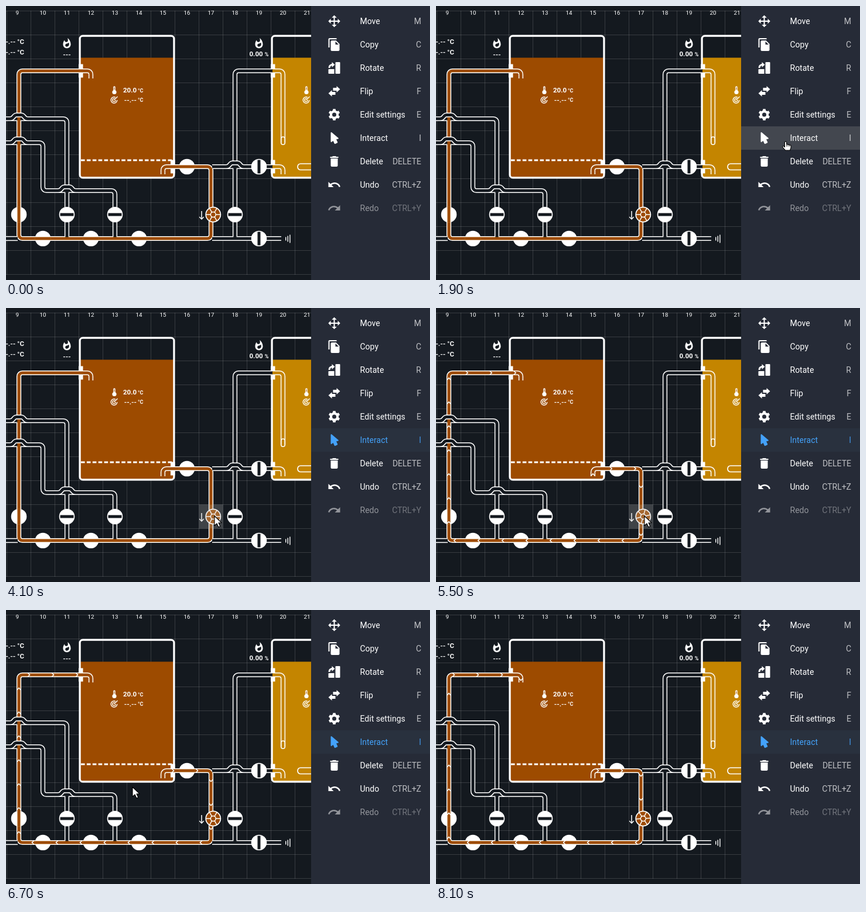
An HTML page with a canvas that plays this animation: 724 by 469 pixels, repeating every 8.2 s.

```html
<!DOCTYPE html>
<html lang="en">
<head>
<meta charset="utf-8">
<title>Brewery builder</title>
<style>
html, body { margin: 0; width: 100%; height: 100%; overflow: hidden; background: #14191f; }
canvas { display: block; }
</style>
</head>
<body>
<canvas id="stage" width="724" height="469"></canvas>
<script>
const ctx = document.getElementById('stage').getContext('2d');
const LOOP = 8200, CELL = 41, PANEL_X = 521;
const BG = '#14191f', WHITE = '#fff', BEER = '#9d4b00', GOLD = '#c48500';
const SELECT_AT = 2100, PUMP_ON = 5000;

const ICONS = {
  move: 'M13 6V11H18V7.75L22.25 12L18 16.25V13H13V18H16.25L12 22.25L7.75 18H11V13H6V16.25L1.75 12L6 7.75V11H11V6H7.75L12 1.75L16.25 6Z',
  copy: 'M16 1H4c-1.1 0-2 .9-2 2v14h2V3h12V1zM15 5l6 6v10c0 1.1-.9 2-2 2H8C6.9 23 6 22.1 6 21V7c0-1.1.9-2 2-2h7zM14 12h5.5L14 6.5V12z',
  rotate: 'M15 2H21Q22 2 22 3V21Q22 22 21 22H15Q14 22 14 21V3Q14 2 15 2ZM3 14H12V22H3Q2 22 2 21V15Q2 14 3 14ZM2 12A6.5 6.5 0 0 1 8 5V2L13 6.5L8 11V8A4 4 0 0 0 5 12Z',
  flip: 'M8 10V13H14V18H8V21L2 15.5ZM22 8.5L16 3V6H10V11H16V14Z',
  interact: 'M13.6 22Q12.8 22.3 12.3 21.5L10.1 16.8L7.6 18.8Q6.2 19.5 6 18V3Q6.2 1.6 7.6 2.2L19.1 11.9Q20 13 18.7 13.6L15.5 14.2L17.7 19Q18 19.9 17.3 20.3Z',
  remove: 'M6 19c0 1.1.9 2 2 2h8c1.1 0 2-.9 2-2V7H6zM19 4h-3.5l-1-1h-5l-1 1H5v2h14z',
  undo: 'M12.5 8C9.85 8 7.45 9 5.6 10.6L2 7V16H11L7.4 12.4C8.8 11.2 10.5 10.5 12.5 10.5C16 10.5 19 12.8 20.1 16L22.5 15.2C21.1 11 17.2 8 12.5 8Z',
  flame: 'M13.5.7s.7 2.6.7 4.8c0 2-1.3 3.7-3.4 3.7-2 0-3.6-1.7-3.6-3.7v-.4C5.2 7.5 4 10.6 4 14c0 4.4 3.6 8 8 8s8-3.6 8-8C20 8.6 17.4 3.8 13.5.7zM11.7 19c-1.8 0-3.1-1.4-3.1-3.1 0-1.6 1-2.8 2.8-3.2 1.8-.4 3.6-1.2 4.6-2.5.4 1.3.6 2.6.6 4 0 2.6-2.2 4.8-4.9 4.8z'
};
for (const k in ICONS) ICONS[k] = new Path2D(ICONS[k]);
ICONS.gear = gearPath();

const MENU = [
  ['Move', 'M', 'move'], ['Copy', 'C', 'copy'], ['Rotate', 'R', 'rotate'],
  ['Flip', 'F', 'flip'], ['Edit settings', 'E', 'gear'], ['Interact', 'I', 'interact'],
  ['Delete', 'DELETE', 'remove'], ['Undo', 'CTRL+Z', 'undo'], ['Redo', 'CTRL+Y', 'undo']
];
const INTERACT = 5, REDO = 8;

// Pointer path: time, x, y
const POINTER = [
  [600, 53, 23], [1400, 600, 262], [1900, 597, 232], [2600, 597, 232], [2900, 469, 227],
  [3000, 469, 227], [3400, 452, 258], [3900, 356, 356], [5800, 356, 356],
  [6700, 216, 303], [7200, 56, 11], [7400, 52, -25]
];

const FLOW = [[268, 288], [268, 275], [350, 275], [350, 398], [22, 398], [22, 111], [145, 111], [145, 124]];
const PIPES = [
  [BG, [[0, 398], [20, 398]]],
  [BG, [[0, 193], [104, 193], [104, 396]]],
  [BG, [[0, 234], [63, 234], [63, 316], [186, 316], [186, 396]]],
  [BG, [[352, 275], [456, 275]]],
  [BG, [[391, 396], [391, 111], [456, 111]]],
  [BG, [[352, 398], [470, 398]]],
  [GOLD, [[455, 275], [473, 275], [473, 288]]],
  [GOLD, [[455, 111], [473, 111], [473, 234]]],
  [BEER, FLOW]
];
const BRIDGES = [[22, 193], [22, 234], [104, 316], [391, 275]];
// Valves: x, y, bar is vertical, open
const VALVES = [
  [22, 357, 1, 1], [104, 357, 0, 0], [186, 357, 0, 0], [391, 357, 0, 0], [309, 275, 0, 1],
  [432, 275, 1, 0], [63, 398, 0, 1], [145, 398, 0, 1], [227, 398, 0, 1], [432, 398, 1, 0]
];

function gearPath() {
  const p = new Path2D();
  for (let i = 0; i < 6; i++) {
    const a = i * Math.PI / 3 - Math.PI / 2;
    for (const [da, r] of [[-.34, 7.6], [-.22, 10], [.22, 10], [.34, 7.6]]) {
      p.lineTo(12 + r * Math.cos(a + da), 12 + r * Math.sin(a + da));
    }
  }
  p.closePath();
  p.moveTo(15.5, 12);
  p.arc(12, 12, 3.5, 0, 7);
  return p;
}

function rect(x, y, w, h, color) {
  ctx.fillStyle = color;
  ctx.fillRect(x, y, w, h);
}

function text(str, x, y, font, color = WHITE, align = 'left') {
  ctx.font = font + ' Roboto, sans-serif';
  ctx.fillStyle = color;
  ctx.textAlign = align;
  ctx.fillText(str, x, y);
}

function icon(path, cx, cy, scale = 1, color = WHITE, mirror = 1) {
  ctx.save();
  ctx.translate(cx, cy);
  ctx.scale(scale * mirror, scale);
  ctx.translate(-12, -12);
  ctx.fillStyle = color;
  ctx.fill(path, 'evenodd');
  ctx.restore();
}

function stroke(color, width) {
  ctx.strokeStyle = color;
  ctx.lineWidth = width;
  ctx.stroke();
}

function line(points, color, width) {
  ctx.beginPath();
  points.forEach(p => ctx.lineTo(...p));
  stroke(color, width);
}

function disc(x, y, r, color) {
  ctx.beginPath();
  ctx.arc(x, y, r, 0, 7);
  ctx.fillStyle = color;
  ctx.fill();
}

function pipe(points, color, width) {
  ctx.beginPath();
  ctx.moveTo(...points[0]);
  for (let i = 1; i < points.length - 1; i++) ctx.arcTo(...points[i], ...points[i + 1], 6);
  ctx.lineTo(...points[points.length - 1]);
  stroke(color, width);
}

function grid() {
  ctx.beginPath();
  for (let x = 1.5; x < PANEL_X; x += CELL) { ctx.moveTo(x, 8); ctx.lineTo(x, 460); }
  for (let y = 8.5; y < 469; y += CELL) { ctx.moveTo(0, y); ctx.lineTo(PANEL_X, y); }
  stroke('rgba(255,255,255,.15)', 1);
  for (let n = 9; n <= 21; n++) text(n, 16.5 + (n - 9) * CELL, 15.3, '9.8px');
}

function tank(x, color) {
  rect(x + 2, 88.5, 160, 205, color);
  ctx.beginPath();
  ctx.roundRect(x + 1.6, 51.1, 160.8, 242.8, 5);
  stroke(WHITE, 3.2);
}

function couplers(x, y) {
  rect(x, y - 11.5, 7.5, 23, WHITE);
}

function sensor(x) {
  ctx.lineCap = 'round';
  line([[x, 139], [x, 147]], WHITE, 3.6);
  disc(x, 147.5, 3.6, WHITE);
  line([[x, 139.5], [x, 143]], BEER, 1);
  ctx.lineCap = 'butt';
  for (const r of [5.3, 2.6]) {
    ctx.beginPath();
    ctx.arc(x - .5, 161, r, 0, 5.2);
    stroke(WHITE, 1.4);
  }
  line([[x - .5, 161], [x + 5.5, 155]], WHITE, 1.5);
}

function bridge(x, y) {
  for (const [color, width] of [[WHITE, 8.2], [BG, 5]]) {
    ctx.beginPath();
    ctx.moveTo(x - 15, y);
    ctx.bezierCurveTo(x - 8, y, x - 10, y - 6.5, x - 4, y - 6.5);
    ctx.lineTo(x + 4, y - 6.5);
    ctx.bezierCurveTo(x + 10, y - 6.5, x + 8, y, x + 15, y);
    stroke(color, width);
  }
}

function valve([x, y, vertical, open]) {
  const half = open ? 13.5 : 11.5;
  disc(x, y, 13.3, WHITE);
  if (vertical) rect(x - 2.5, y - half, 5, half * 2, open ? BEER : BG);
  else rect(x - half, y - 2.5, half * 2, 5, open ? BEER : BG);
}

function chevrons(t) {
  // One chevron per cell, advancing a full cell in 1.8 s
  let start = ((3 + (t - 5500) / 1800 * CELL) % CELL + CELL) % CELL;
  for (let i = 1; i < FLOW.length; i++) {
    const [x, y] = FLOW[i - 1], dx = FLOW[i][0] - x, dy = FLOW[i][1] - y;
    const len = Math.hypot(dx, dy);
    for (; start < len; start += CELL) {
      ctx.save();
      ctx.translate(x + dx * start / len, y + dy * start / len);
      ctx.rotate(Math.atan2(dy, dx));
      line([[-2, -3], [1.3, 0], [-2, 3]], WHITE, 1.5);
      ctx.restore();
    }
    start -= len;
  }
}

function pump(t) {
  const angle = t < PUMP_ON ? 0 : (t - PUMP_ON) / 1700 * 2 * Math.PI;
  ctx.save();
  ctx.translate(353.8, 357);
  disc(0, 0, 12.6, BEER);
  stroke(WHITE, 1.7);
  ctx.rotate(angle);
  for (let i = 0; i < 6; i++) {
    line([[4.3, 0], [12.5, 0]], WHITE, 1.5);
    ctx.rotate(Math.PI / 3);
  }
  ctx.beginPath();
  ctx.arc(0, 0, 4.4, 0, 7);
  stroke(WHITE, 1.5);
  ctx.restore();
  line([[334, 351], [334, 364.5]], WHITE, 1.5);
  line([[330.2, 361], [334, 365], [337.8, 361]], WHITE, 1.5);
}

function readouts() {
  const bold = 'bold 11.5px';
  for (const y of [65, 83]) text('--.-- °C', 31, y, bold, WHITE, 'right');
  for (const x of [104, 432]) icon(ICONS.flame, x, 64, .82);
  text('---', 104, 87, bold, WHITE, 'center');
  text('0.00', 415.5, 86, bold);
  text('%', 448.5, 86, 'bold 9px', WHITE, 'right');
  text('20.0', 200, 148, bold);
  text('--.--', 223, 165, bold, WHITE, 'right');
  for (const y of [148, 164]) text('°C', 225, y, 'bold 9px');
  sensor(185);
  sensor(513);
}

function plant(t) {
  tank(124.5, BEER);
  tank(452.5, GOLD);
  ctx.setLineDash([6.6, 3.3]);
  line([[128, 264], [285, 264]], WHITE, 3);
  ctx.setLineDash([]);
  couplers(124, 111);
  couplers(281, 275);
  couplers(452, 111);
  couplers(452, 275);

  PIPES.forEach(([, points]) => pipe(points, WHITE, 8.2));
  PIPES.forEach(([color, points]) => pipe(points, color, 5.2));
  ctx.beginPath();
  ctx.roundRect(469.7, 224, 6.6, 13.2, 3.3);
  stroke(WHITE, 1.6);
  ctx.beginPath();
  ctx.roundRect(498, 270, 50, 10.5, 5);
  stroke(WHITE, 1.7);

  VALVES.forEach(valve);
  if (t >= PUMP_ON) chevrons(t);
  BRIDGES.forEach(b => bridge(...b));
  pump(t);
  for (let i = 0; i < 3; i++) {
    line([[477.7 + i * 3.6, 395.5 - i * 2], [477.7 + i * 3.6, 401.5 + i * 2]], WHITE, 1.4);
  }
  readouts();
}

function pointerAt(t) {
  const i = POINTER.findIndex(p => p[0] > t);
  if (i < 1) return null;
  const [t0, x0, y0] = POINTER[i - 1], [t1, x1, y1] = POINTER[i];
  const k = (t - t0) / (t1 - t0);
  return { x: x0 + (x1 - x0) * k, y: y0 + (y1 - y0) * k };
}

function highlights(t, p) {
  const glow = 'rgba(192,192,192,.25)';
  if (t >= 3100 && t < 3600) rect(452.5, 49.5, 164, 246, glow);
  if (p && p.x > 329 && p.x < 371 && p.y > 336 && p.y < 378) rect(329.5, 336.5, CELL, CELL, glow);
}

function menu(t, p) {
  rect(PANEL_X, 0, 203, 469, '#262b37');
  let hover = p && p.x > PANEL_X ? Math.floor((p.y - 6) / 40) : -1;
  if (t >= SELECT_AT && t < 3100) hover = INTERACT;
  const on = Math.max(0, Math.min(1, (t - SELECT_AT + 100) / 400));
  const blue = `rgb(${255 - 187 * on},${255 - 93 * on},${255 - 5 * on})`;

  MENU.forEach(([label, key, name], i) => {
    const y = 26 + i * 40, active = i === INTERACT && t >= SELECT_AT;
    if (i === hover) rect(PANEL_X, y - 20, 203, 40, '#43474f');
    else if (active) rect(PANEL_X, y - 20, 203, 40, '#29313e');
    const color = active ? blue : WHITE;
    ctx.globalAlpha = i === REDO ? .5 : 1;
    icon(ICONS[name], 560.5, y, 1, color, i === REDO ? -1 : 1);
    text(label, 604.5, y + 5, '14px', color);
    ctx.globalAlpha *= active ? .85 : .7;
    text(key, 709, y + 5, '14px', color, 'right');
    ctx.globalAlpha = 1;
  });
}

const ARROW = new Path2D('M0 0V16.5L4 12.8L6.8 19L9.8 17.7L7 11.8H12.3Z');
const HAND = new Path2D('M-1.6 1Q0 -1 1.6 1V5Q3.2 4 4 5.5Q6 4.5 6.5 6.2Q9 5.5 9 8V11L7.5 15H-.5L-5.2 9.5Q-5 7 -3 8L-1.6 9.5Z');

function pointer(p) {
  ctx.save();
  ctx.translate(p.x, p.y);
  ctx.lineJoin = 'round';
  const shape = p.x > PANEL_X ? HAND : ARROW;
  ctx.fillStyle = WHITE;
  ctx.fill(shape);
  ctx.strokeStyle = '#000';
  ctx.lineWidth = 1.1;
  ctx.stroke(shape);
  if (shape === HAND) {
    for (const x of [1.5, 4, 6.5]) line([[x, 5.5], [x, 8.5]], '#000', .8);
  }
  ctx.restore();
}

function draw(now) {
  const t = Math.floor(now % LOOP / 100) * 100;
  const p = pointerAt(t);
  rect(0, 0, 724, 469, BG);
  grid();
  plant(t);
  highlights(t, p);
  menu(t, p);
  if (p) pointer(p);
}

const begin = performance.now();
function tick() {
  draw(performance.now() - begin);
  requestAnimationFrame(tick);
}
tick();
</script>
</body>
</html>
```
